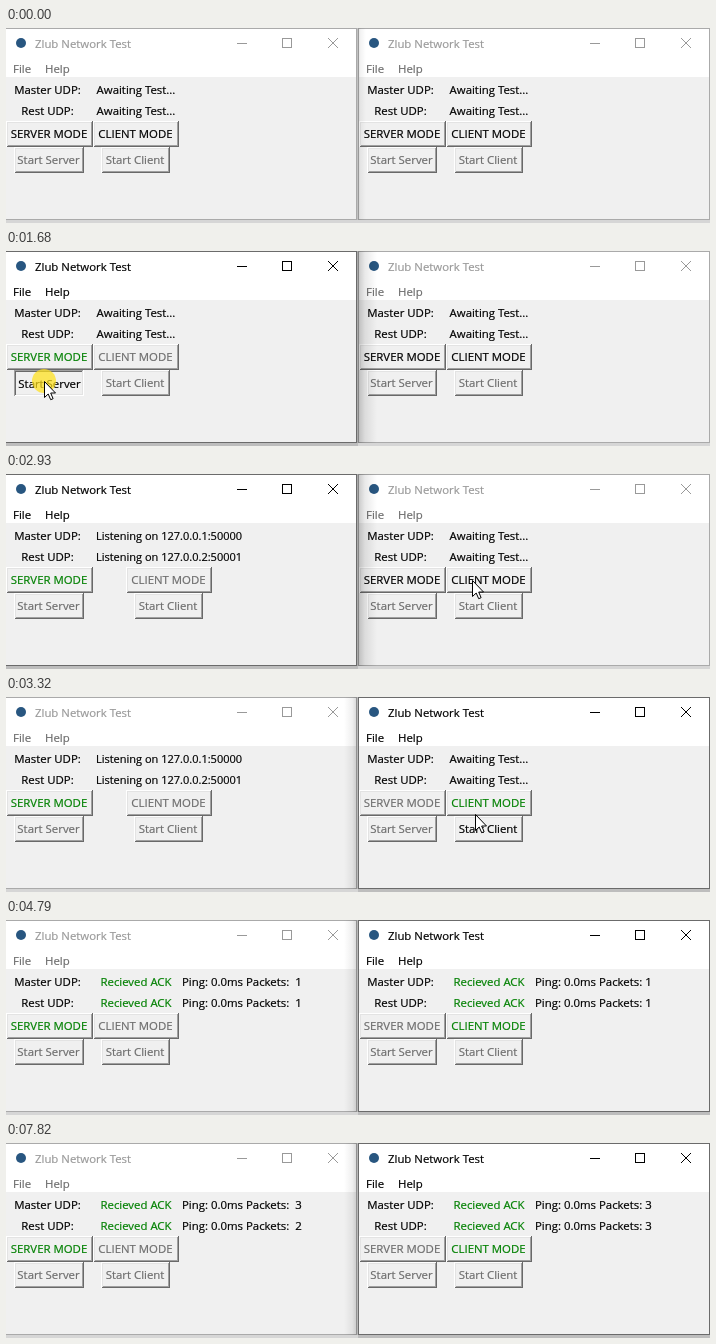
Recreate the animation shown at these times as an HTML page. Size 704 by 195 pixels, loop 8000 ms.

```html
<!DOCTYPE html>
<html lang="en">
<head>
<meta charset="utf-8">
<title>Network Test</title>
<style>
  html, body { margin: 0; width: 100%; height: 100%; overflow: hidden; background: #fff; }
  svg { display: block; width: 704px; height: 195px; }
  text { font: 11.4px "Open Sans", "Noto Sans", sans-serif; white-space: pre; stroke-width: .2px; }
  .mid { text-anchor: middle; }
  .address { font-size: 11px; }
  .crisp { shape-rendering: crispEdges; }
</style>
</head>
<body>
<svg id="stage" viewBox="0 0 704 195"></svg>
<script>
const LOOP = 8000;
const GREY = '#6d6d6d', GREEN = '#008000', BLACK = '#000';
const stage = document.getElementById('stage');

// Moments of the story, in ms
const T = { server: 1200, listen: 1830, focusRight: 3000, client: 3163, ack: 3780 };
const presses = [
  [1050, T.server, 'SERVER MODE', 0],
  [1680, T.listen, 'Start Server', 0],
  [T.focusRight, T.client, 'CLIENT MODE', 1],
  [3720, T.ack, 'Start Client', 1]
];

// Pointer moves: first step, last step, number of steps, start, bend, end
const moves = [
  [650, 970, 5, [-12, 150], [12, 120], [34, 105]],
  [1280, 1510, 4, [34, 105], [37, 118], [38, 130]],
  [2060, 2930, 12, [38, 130], [220, 154], [466, 106]],
  [3240, 3550, 5, [466, 106], [470, 122], [474, 133]],
  [4010, 4240, 4, [474, 133], [476, 165], [479, 200]]
];

function pointerAt(t) {
  const move = moves.filter(m => t >= m[0]).pop();
  if (!move) return null;
  const [from, to, steps, a, b, c] = move;
  const step = Math.floor((t - from) / (to - from) * (steps - 1) + 1e-6) + 1;
  const k = Math.min(step, steps) / steps;
  const e = k * k * (3 - 2 * k);
  return a.map((v, i) => (1 - e) ** 2 * v + 2 * e * (1 - e) * b[i] + e * e * c[i]);
}

const rect = (x, y, w, h, fill) =>
  `<rect class="crisp" x="${x}" y="${y}" width="${w}" height="${h}" fill="${fill}"/>`;
const line = (d, color, cls = 'crisp') =>
  `<path class="${cls}" d="${d}" fill="none" stroke="${color}"/>`;
const text = (x, y, str, color = BLACK, cls = '') =>
  `<text class="${cls}" x="${x}" y="${y}" fill="${color}" stroke="${color}">${str}</text>`;

function button(x, y, w, label, color, sunken) {
  const h = 26;
  const [outerTL, innerTL, innerBR, outerBR] = sunken
    ? ['#a0a0a0', '#696969', '#e3e3e3', '#fff']
    : ['#fff', '#e3e3e3', '#a0a0a0', '#696969'];
  const topLeft = (i, c) => line(`M${x + i + .5} ${y + h - i}V${y + i + .5}H${x + w - i}`, c);
  const bottomRight = (i, c) => line(`M${x + i + 1} ${y + h - i - .5}H${x + w - i - .5}V${y + i}`, c);
  const shift = sunken ? 1 : 0;
  return topLeft(0, outerTL) + topLeft(1, innerTL) + bottomRight(1, innerBR) + bottomRight(0, outerBR)
    + text(x + w / 2 - .5 + shift, y + 17 + shift, label, color, 'mid');
}

function appWindow(x, active, s) {
  const caption = active ? BLACK : '#999';
  const menu = active ? BLACK : GREY;
  const extra = s.wide ? 33 : 0;
  const col = 130 + extra;
  let out = rect(-1, 0, 352, 192, active ? '#6b6b6b' : '#aaa')
    + rect(0, 1, 350, 48, '#fff') + rect(0, 49, 350, 142, '#f0f0f0')
    + '<circle cx="15" cy="15" r="5" fill="#285680"/>'
    + text(29, 20, 'Zlub Network Test', caption)
    + line('M231 15.5h10M276.5 10.5h9v9h-9z', caption)
    + line('M322 10l10 10m0-10l-10 10', caption, '')
    + text(7, 45, 'File', menu) + text(39, 45, 'Help', menu);
  ['Master UDP:', 'Rest UDP:'].forEach((name, i) => {
    const y = 66 + 21 * i;
    out += text(41.5, y, name, BLACK, 'mid')
      + text(col, y, s.status[i], s.color, s.wide ? 'mid address' : 'mid');
    if (s.packets[i]) out += text(176, y, `Ping: 0.0ms Packets:${s.gap}${s.packets[i]}`);
  });
  const places = [[0, 93, 87], [87 + extra, 93, 86], [8, 119, 70], [95 + extra, 119, 69]];
  ['SERVER MODE', 'CLIENT MODE', 'Start Server', 'Start Client'].forEach((label, i) => {
    out += button(...places[i], label, s.colors[i], s.pressed === label);
  });
  return `<g transform="translate(${x})">${out}</g>`;
}

function stateOf(side, t) {
  const press = presses.find(p => p[3] === side && t >= p[0] && t < p[1]);
  const chosen = t >= (side ? T.client : T.server);
  const started = t >= (side ? T.ack : T.listen);
  const acked = t >= T.ack;
  const listening = !side && started && !acked;
  const colors = [BLACK, BLACK, GREY, GREY];
  if (chosen) {
    colors[side] = GREEN;
    colors[1 - side] = GREY;
    if (!started) colors[2 + side] = BLACK;
  }
  // Replies arrive about every two seconds
  const count = since => t < since ? 0 : 1 + Math.floor((t - since) / 2020);
  const master = count(T.ack), rest = side ? master : count(4790);
  return {
    pressed: press && press[2],
    wide: listening,
    status: acked ? Array(2).fill('Recieved ACK')
      : listening ? ['Listening on 127.0.0.1:50000', 'Listening on 127.0.0.2:50001']
      : Array(2).fill('Awaiting Test...'),
    color: acked ? GREEN : BLACK,
    packets: [master, rest],
    gap: side ? ' ' : '  ',
    colors
  };
}

function shadow(x, width, strength, flip) {
  const [x1, x2] = flip ? [1, 0] : [0, 1];
  return `<linearGradient id="fade" x1="${x1}" x2="${x2}">
    <stop stop-opacity="${strength}"/><stop offset=".4" stop-opacity="${strength * .35}"/>
    <stop offset="1" stop-opacity="0"/></linearGradient>` + rect(x, 0, width, 192, 'url(#fade)');
}

function pointer(t) {
  const at = pointerAt(t);
  if (!at) return '';
  const [x, y] = at.map(Math.round);
  const pressed = presses.some(p => t >= p[0] && t < p[1]);
  return (pressed ? `<circle cx="${x}" cy="${y}" r="12" fill="#ffe01a" opacity=".72"/>` : '')
    + `<path transform="translate(${x + .5} ${y + .5})" fill="#fff" stroke="#000"
       d="M0 0V16L3.7 12.5L6.2 18.2L8.6 17.2L6.2 11.5H11Z"/>`;
}

function scene(t) {
  const rightFront = t >= T.focusRight;
  const leftActive = t >= 1050 && !rightFront;
  const left = appWindow(0, leftActive, stateOf(0, t));
  const right = appWindow(353, rightFront, stateOf(1, t));
  const ground = rect(0, 192, 352, 3, leftActive ? '#bdbdbd' : '#d6d6d6')
    + rect(352, 192, 352, 3, rightFront ? '#bdbdbd' : '#d6d6d6')
    + rect(351, 0, 1, 192, '#ddd');
  const windows = rightFront
    ? left + shadow(338, 14, .18, true) + right
    : right + shadow(351, leftActive ? 20 : 9, leftActive ? .24 : .14, false) + left;
  return ground + windows + pointer(t);
}

let shown = '';
function frame(now) {
  const markup = scene(now % LOOP);
  if (markup !== shown) stage.innerHTML = shown = markup;
  requestAnimationFrame(frame);
}
frame(0);
</script>
</body>
</html>
```
